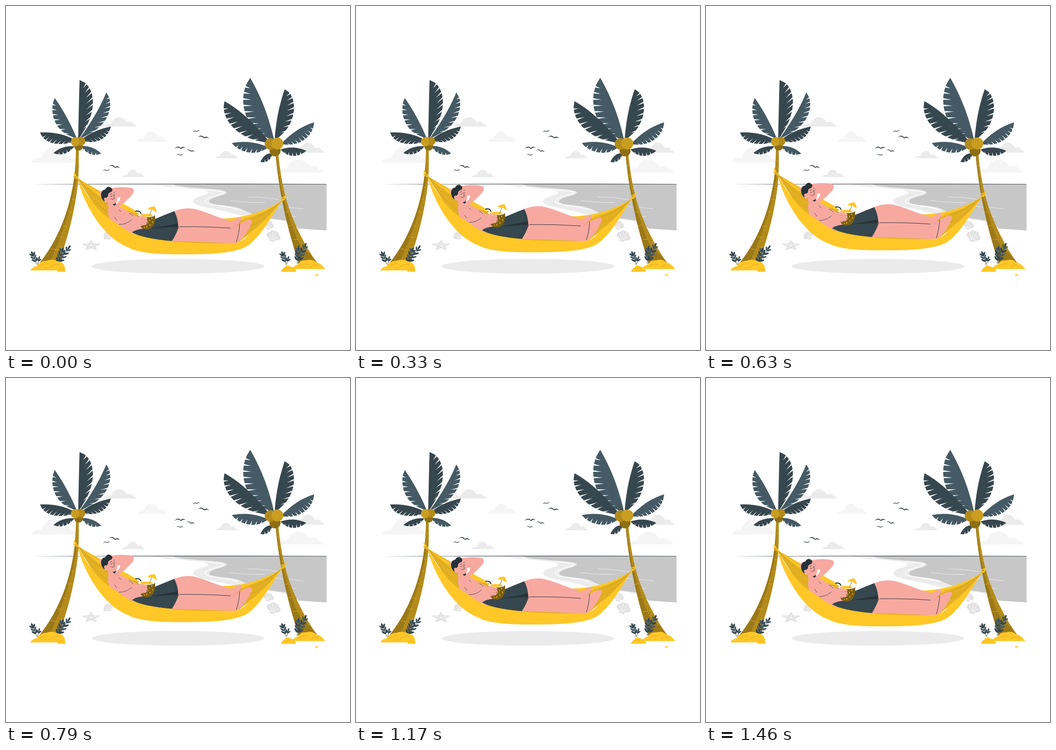
Animation, 748 px wide and 748 px high, one loop 1500 ms. Source, as an HTML page:

```html
<!DOCTYPE html>
<html lang="en">
<head>
<meta charset="utf-8">
<title>Hammock</title>
<style>
html, body { margin: 0; width: 100%; height: 100%; overflow: hidden; background: #fff; }
svg { display: block; width: 100vw; height: 100vh; }
</style>
</head>
<body>
<svg id="stage" viewBox="0 0 748 748"></svg>
<script>
const YELLOW = '#ffc727', SHADE = '#e3b023', BARK = '#b38b1b', DEEP = '#9b7818', SKIN = '#f7a9a0';
const SLATE = '#37474f', STEEL = '#455a64', INK = '#263238', MIST = '#ebebeb', PALE = '#f5f5f5';

const fill = (color, d) => `<path fill="${color}" d="${d}"/>`;
const line = (color, width, d) =>
  `<path fill="none" stroke="${color}" stroke-width="${width}" stroke-linecap="round" stroke-linejoin="round" d="${d}"/>`;
const oval = (color, x, y, rx, ry = rx, turn = 0) =>
  `<ellipse fill="${color}" rx="${rx}" ry="${ry}" transform="translate(${x} ${y}) rotate(${turn})"/>`;

// Half a palm leaf: smooth spine on one side, notched edge on the other.
function frond([color, bx, by, sx, sy, tx, ty, ax, ay, cx, cy, notches]) {
  const spine = t => [[tx, sx, bx], [ty, sy, by]].map(([p, q, r]) =>
    (1 - t) ** 2 * p + 2 * t * (1 - t) * q + t * t * r);
  const rim = t => [[tx, ax, cx, bx], [ty, ay, cy, by]].map(([p, q, r, s]) =>
    (1 - t) ** 3 * p + 3 * t * (1 - t) ** 2 * q + 3 * t * t * (1 - t) * r + t ** 3 * s);
  const points = [];
  for (let i = 0; i <= 10; i++) points.push(spine(1 - i / 10));
  for (let k = 1; k <= notches; k++) {
    const t = 0.06 + 0.82 * k / (notches + 0.6), gap = 0.1 / notches;
    const outer = rim(t), inner = spine(Math.min(1, t + 0.07));
    points.push(rim(t - 0.4 / notches), rim(t - gap),
      outer.map((v, i) => v * 0.55 + inner[i] * 0.45), rim(t + gap));
  }
  points.push(rim(0.95));
  return fill(color, 'M' + points.map(p => p.map(v => v.toFixed(1))).join('L') + 'Z');
}

const cloud = (x, y, w, h, color) => `<g transform="translate(${x} ${y}) scale(${w} ${h})">` +
  fill(color, 'M0 1C.04.75.12.68.22.7C.28.25.36 0 .46 0C.58 0 .66.25 .7.56C.8.42.88.5.9.76C.96.75 1 .86 1 1Z') + '</g>';

const bird = (x, y, s, turn = 0) => `<g transform="translate(${x} ${y}) rotate(${turn}) scale(${s})">` +
  fill(INK, 'M-13 2Q-7-5-1-1L1 1Q6-4 12 2Q6-1 1 3L-1 1Q-7-3-13 2Z') + '</g>';

// Stem with pairs of leaves and one at the end.
function sprig(x, y, dx, dy, pairs, size) {
  const angle = Math.atan2(dy, dx) * 180 / Math.PI;
  let out = line(SLATE, 1, `M${x} ${y}l${dx} ${dy}`) + oval(SLATE, x + dx, y + dy, size, size * .4, angle);
  for (let i = 0; i < pairs; i++) {
    const t = (i + 1) / (pairs + 1);
    for (const side of [-1, 1]) {
      const turn = angle + side * 38, a = turn * Math.PI / 180;
      out += oval(i % 2 ? STEEL : SLATE, x + dx * t + Math.cos(a) * size, y + dy * t + Math.sin(a) * size, size, size * .38, turn);
    }
  }
  return out;
}

const shell = (x, y, s, turn) => `<g transform="translate(${x} ${y}) rotate(${turn}) scale(${s})">` +
  fill('#e0e0e0', 'M-4 10L-15 4Q-17-4-10-6Q-7-13 0-11Q7-13 10-6Q17-4 15 4L4 10L7 13H-7Z') +
  line('#fff', 1, 'M-2 9L-10-3M-1 8L-4-9M1 8L4-9M2 9L10-3') + '</g>';

function starfish() {
  let d = '';
  for (let i = 0; i < 10; i++) {
    const a = i * Math.PI / 5 - Math.PI / 2, r = i % 2 ? .42 : 1;
    d += `${i ? 'L' : 'M'}${185 + 19 * r * Math.cos(a)} ${521 + 11 * r * Math.sin(a)}`;
  }
  return `<path d="${d}Z" fill="#e0e0e0" stroke="#e0e0e0" stroke-width="2" stroke-linejoin="round"/>` +
    line('#fff', 1, 'M185 521v-8M185 521l-13-3M185 521l13-3M185 521l-8 6M185 521l8 6');
}

const scenery = [
  cloud(164, 235, 66, 27, PALE), cloud(212, 242, 72, 20, MIST), cloud(285, 273, 65, 22, PALE),
  cloud(56, 307, 96, 33, PALE), cloud(455, 315, 49, 16, MIST), cloud(252, 356, 49, 16, MIST),
  cloud(588, 334, 102, 28, PALE), cloud(625, 297, 67, 22, MIST),
  fill(MIST, 'M318 388C350 396 435 397 440 405C442 411 406 414 407 425C409 437 456 440 486 449C520 459 570 462 600 467L640 484L697 440V388Z'),
  fill('#c7c7c7', 'M362 388C390 397 476 396 480 405C482 412 440 415 442 426C444 434 490 432 511 441C535 454 570 462 607 466C620 470 630 476 636 484L697 488V387Z'),
  line('#fff', 1.6, 'M361 391C385 401 470 399 474 405C474 411 432 415 433 425C436 434 480 433 506 443'),
  line('#ebebeb', 1.2, 'M488 423Q525 428 563 427M526 415Q565 416 593 421M606 437Q630 439 646 441M578 434l22 3M610 456l20 2'),
  fill(INK, 'M57 387.5Q370 385.6 697 387.1V387.7Q370 388 57 387.5Z'),
  bird(236, 349, 1, 8), bird(219, 357, .65, -8), bird(379, 308, 1, -5), bird(401, 314.5, .8, 8),
  bird(378, 323.5, .65), bird(414, 272, .65, -10), bird(430, 285, 1, 5),
  shell(222, 499, .7, -30), shell(571, 476, .75, 15), shell(582, 500, 1, 20), starfish(),
  oval(MIST, 374, 566, 188, 16)
].join('');

const hammock = [
  // Cloth
  fill(SHADE, 'M155 374C195 400 245 430 280 446L330 480H440L465 462Q535 463 599 424L570 465L500 518H310L215 470Z'),
  fill(YELLOW, 'M155 374C190 395 240 422 277 442L290 453L245 440Q195 410 155 374Z'),
  line('#c99c1f', .8, 'M158 377Q187 411 225 435M158 377Q180 421 226 452M158 377Q205 408 250 430'),
  fill(YELLOW, 'M465 462Q535 463 599 424Q560 455 500 470Z'),
  line('#c99c1f', .8, 'M597 427Q570 451 532 465M597 427Q570 463 528 481M597 427Q560 455 517 463'),
  // Raised arm
  fill('#fff', 'M237 421L249 416L247 425L240 430Z'),
  fill(SKIN, 'M205 412C201 404 209 400 217 399C232 394 261 392 274 396C281 399 278 408 271 414C263 423 253 431 245 438L238 432Q249 424 248 416L229 419Z'),
  // Torso
  fill(SKIN, 'M223 427L239 430C251 440 271 449 285 458L326 468L302 489C286 502 263 500 246 488C226 476 219 452 223 437Z'),
  // Shorts
  fill(INK, 'M306 480L366 446Q375 462 375 481L300 488Z'),
  fill(SLATE, 'M322 464Q345 454 366 446Q372 458 374 473L314 484Z'),
  fill(SLATE, 'M274 492Q286 483 312 484L376 480Q370 497 361 511C324 508 292 502 274 492Z'),
  line(INK, .8, 'M362 449Q369 463 370 473M368 482Q364 498 356 508'),
  // Legs
  fill(SKIN, 'M366 446C382 439 401 438 416 443C439 449 468 463 490 468Q503 459 511 461Q516 462 510 469L494 486L375 481Q374 461 366 446Z'),
  fill(SKIN, 'M376 480L488 485C503 478 519 465 530 465Q538 465 533 474C526 491 516 505 502 516L361 511Q371 496 376 480Z'),
  line(INK, 1, 'M377 480Q430 479 488 483M508 474Q507 495 501 513'),
  line('#d88a82', .8, 'M494 484Q507 473 512 465'),
  // Front of the cloth
  fill(YELLOW, 'M155 374C172 406 200 451 237 470Q267 493 286 499C340 514 430 518 501 515Q519 510 530 493Q560 473 599 424C574 463 555 499 527 520C500 541 418 540 380 540C335 540 290 538 266 525C210 504 168 428 155 374Z'),
  // Head
  fill(SKIN, 'M214 417L222 405L235 403Q241 411 242 421Q241 429 236 432L239 438Q229 444 222 435L222 427Q213 429 213 421Z'),
  fill(INK, 'M214 425C207 420 205 410 208 405Q210 400 216 399C218 393 225 392 228 395Q234 399 229 404C224 406 221 408 222 413L218 418Z'),
  oval(SKIN, 217, 421, 3.5, 4.5, -20),
  fill(INK, 'M232 431Q236 431 239 428Q239 434 235 434Z'),
  line(INK, .9, 'M226 410l4-2M234 406l2-1M227 414q2 1 4-1M235 411l2-1M233 410q4 5 1 7M229 420q5 2 8-3'),
  fill('#ef8f87', 'M225 419q3-3 5 0q-1 4-5 0'),
  // Drink
  line(INK, 2.2, 'M282 446Q291 445 292 449L297 456'),
  fill('#7b5e13', 'M287 455H324C326 475 318 485 306 486C293 486 286 474 287 455Z'),
  oval('#fff', 305, 455, 18, 4.3), oval(YELLOW, 305, 455, 14, 3),
  line('#9c8a52', 1.2, 'M318 441L312 455'),
  fill(YELLOW, 'M307 442Q314 435 323 436Q327 441 328 449L318 443Z'),
  line(SHADE, 1.8, 'M312 465v2M317 461v2M319 469v2M313 475v2M306 479v2M308 470v2M301 481v1'),
  // Near arm and hand
  fill(SKIN, 'M226 452C232 470 242 478 260 478L280 482Q289 483 294 478L304 476Q308 474 305 471Q310 468 306 465Q310 461 304 459Q292 455 283 459L270 464Z'),
  line(INK, .8, 'M246 475Q260 476 273 465M268 451q6 2 8 6M246 444l4 3M236 459l5 7'),
  line('#d88a82', .8, 'M293 464l12 1M293 470l12 1M292 475l10 1')
].join('');

const ropes = line(YELLOW, 2, 'M148 363Q148 370 157 373M147 370Q150 375 158 376M149 363l3 6') +
  line(YELLOW, 2.2, 'M599 417Q607 416 609 411M597 424Q607 423 608 413M600 420Q605 421 608 416');

const leftPalm = [
  [SLATE, 157, 290, 158, 226, 160, 161, 196, 172, 202, 232, 8],
  [STEEL, 160, 288, 199, 235, 218, 188, 235, 208, 232, 262, 8],
  [STEEL, 154, 288, 133, 238, 106, 200, 94, 225, 100, 275, 7],
  [SLATE, 153, 293, 121, 273, 74, 275, 82, 300, 118, 307, 7],
  [SLATE, 162, 292, 189, 270, 228, 262, 222, 287, 198, 304, 7],
  [SLATE, 149, 305, 121, 303, 103, 320, 121, 327, 138, 320, 4],
  [STEEL, 163, 304, 190, 304, 207, 321, 190, 328, 173, 321, 4]
];
const rightPalm = [
  [STEEL, 583, 292, 567, 218, 531, 156, 501, 196, 514, 274, 9],
  [SLATE, 584, 292, 588, 232, 606, 181, 635, 193, 637, 260, 8],
  [SLATE, 575, 298, 524, 234, 475, 207, 465, 242, 500, 292, 8],
  [STEEL, 598, 300, 632, 264, 670, 253, 668, 287, 633, 308, 8],
  [STEEL, 570, 307, 532, 290, 491, 298, 505, 317, 545, 330, 6],
  [SLATE, 597, 312, 625, 302, 653, 315, 634, 330, 612, 330, 5],
  [SLATE, 580, 321, 564, 317, 553, 339, 566, 342, 576, 335, 3]
];

const trunks = [
  fill(BARK, 'M152 310H158C159 345 158 379 154 405C146 460 132 513 112 565H68C115 510 153 420 152 310Z'),
  fill(DEEP, 'M152 314C153 421 115 510 68 565H91C113 523 142 443 152 379Z'),
  line(SHADE, .9, 'M154 338h4M149 394l5 1M143 420l5 1M135 447l9 2M124 478l8 2M113 502l10 1M98 528l12 2M119 524l6 1'),
  fill(BARK, 'M586 318L592 317C596 370 607 420 621 455C639 501 660 537 681 564H638C620 509 594 420 586 318Z'),
  fill(DEEP, 'M586 318C594 420 620 509 638 564H681L661 540Q639 528 628 494C606 437 594 386 588 322Z'),
  line(SHADE, .9, 'M589 347l4-1M592 369l4-1M600 398l3-1M607 449l7-2M615 478l8-2M624 508l11-1M631 526l9-2M641 507l6-1')
].join('');

const crowns = [
  ...leftPalm.map(frond),
  oval('#8f6f16', 158, 305, 9.5), oval(BARK, 163, 294, 9.5), oval('#c99d1f', 151, 295, 10),
  line(DEEP, .8, 'M155 285Q164 294 158 303'),
  ...rightPalm.map(frond),
  oval('#8f6f16', 585, 315, 12), oval(BARK, 575, 300, 12.5), oval('#c99d1f', 590, 299, 13),
].join('');

const ground = [
  sprig(67, 562, -10, -24, 3, 5), sprig(69, 562, 3, -14, 1, 4),
  sprig(110, 563, 13, -33, 4, 5.5), sprig(112, 563, 25, -38, 4, 5),
  sprig(609, 562, -8, -24, 3, 5), sprig(610, 562, 4, -14, 1, 4),
  sprig(633, 560, 3, -33, 4, 5.5), sprig(635, 560, 16, -40, 4, 5),
  fill(YELLOW, 'M53 575Q57 567 66 566Q74 554 88 554Q100 549 112 555Q124 556 128 567L129 578H113L111 575Z'),
  line(SHADE, 1.2, 'M73 566Q83 558 93 561M96 568Q105 559 116 563M82 570l12-1M114 573q8-3 14 2'),
  fill(YELLOW, 'M621 572Q627 564 636 561Q640 552 653 553Q666 549 674 557Q685 559 694 572Z'),
  line(SHADE, 1.2, 'M638 565Q649 558 658 562M663 567Q673 560 680 565'),
  fill(YELLOW, 'M598 578Q600 571 605 569Q610 561 617 566Q629 568 631 578Z'),
  line(SHADE, 1, 'M606 573Q613 567 619 571'),
  fill(YELLOW, 'M671 586Q675 580 680 586Z')
].join('');

document.getElementById('stage').innerHTML = scenery +
  `<g class="float">${hammock}</g>` + trunks + `<g class="float">${ropes}</g>` + crowns + ground;

const LOOP = 1500, LIFT = 10.5, LEAD = 20;
const floaters = document.querySelectorAll('.float');

function draw(now) {
  const phase = ((now + LEAD) % LOOP) / LOOP;
  const rise = LIFT * (1 - Math.abs(1 - 2 * phase));
  floaters.forEach(g => g.setAttribute('transform', `translate(0 ${(0.3 - rise).toFixed(2)})`));
}

const start = performance.now();
function tick() {
  draw(performance.now() - start);
  requestAnimationFrame(tick);
}
tick();
</script>
</body>
</html>
```
